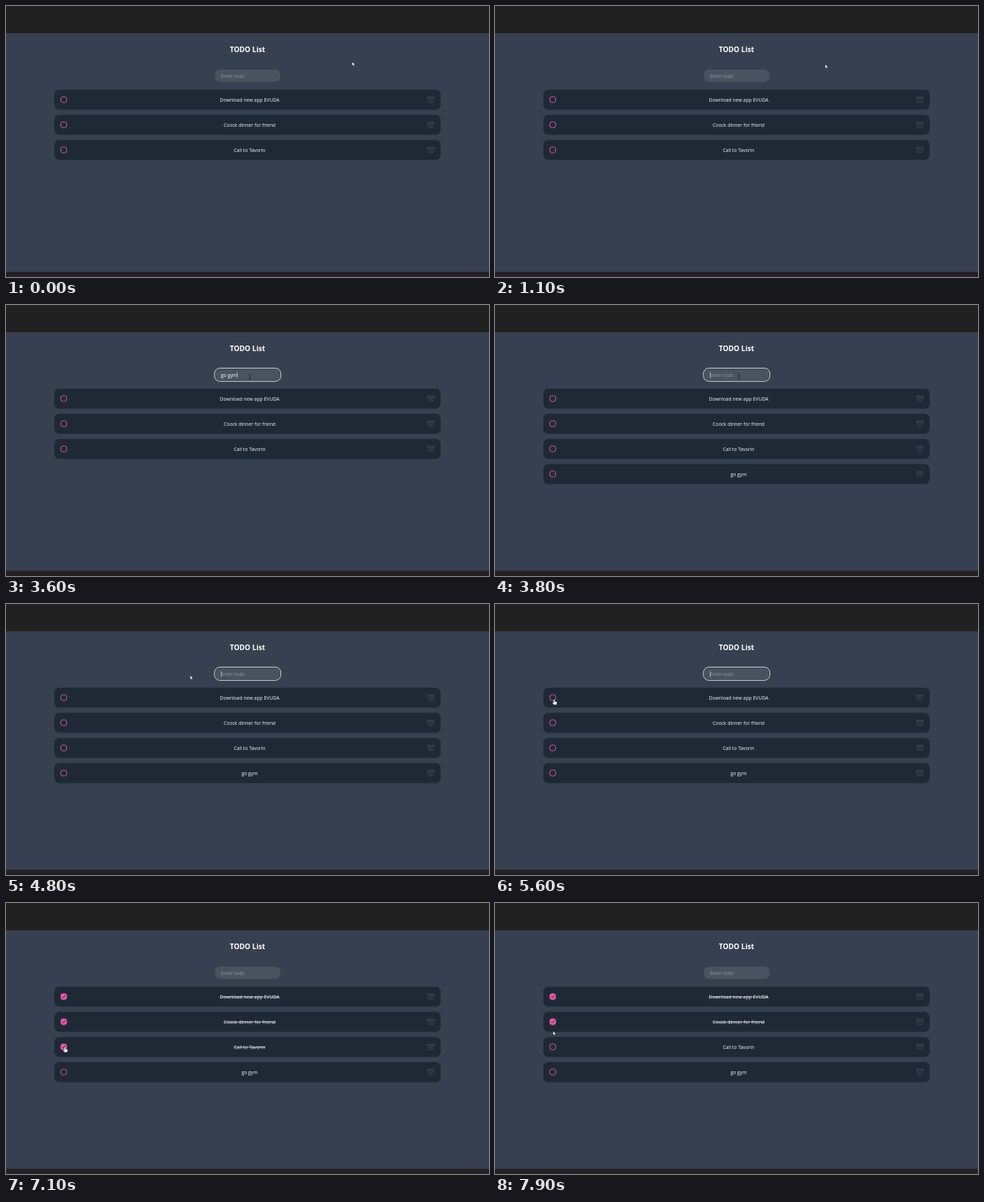
Recreate the animation shown at these times as an HTML page with a canvas. Size 690x388 px, loop 8 s.

```html
<!DOCTYPE html>
<html lang="en">
<head>
<meta charset="utf-8">
<title>TODO List</title>
<style>
  html, body { margin: 0; width: 100%; height: 100%; overflow: hidden; background: #374050; }
  canvas { display: block; width: 690px; height: 388px; }
</style>
</head>
<body>
<canvas id="stage"></canvas>
<script>
const W = 690, H = 388, LOOP = 8000, STEP = 100;
const FONT = '"Open Sans", "Noto Sans", sans-serif';
const PINK = '#e558a8';

const canvas = document.getElementById('stage');
const ctx = canvas.getContext('2d');
const ratio = window.devicePixelRatio || 1;
canvas.width = W * ratio;
canvas.height = H * ratio;

// on/off: when a task is ticked and unticked; from: when it is added
const tasks = [
  { text: 'Download new app EVUDA', on: 5700 },
  { text: 'Coock dinner for friend', on: 6200 },
  { text: 'Call to Tavorin', on: 7100, off: 7700 },
  { text: 'go gym', from: 3800 }
];
const focus = { from: 1900, to: 5700 };
const typing = [[2400, 'g'], [2500, 'go'], [2700, 'go '], [3000, 'go g'],
                [3100, 'go gy'], [3600, 'go gym'], [3800, '']];

// pointer path: time, x, y
const path = [
  [0, 494.5, 80], [1000, 494.5, 80], [1400, 349, 103], [1900, 349, 103],
  [2000, 348.4, 103], [4300, 348.4, 103], [4400, 347, 85], [4500, 347, 85],
  [5300, 82, 139.5], [5500, 82, 139.5], [5600, 84.5, 136.5], [5700, 84.5, 136.5],
  [6100, 84, 171], [6200, 84, 171], [6400, 83.5, 177], [6900, 84, 206],
  [7400, 84, 206], [7500, 83.5, 206.5], [7700, 83.5, 206.5], [7900, 83, 183.5]
];

const rowY = i => 134.1 + i * 36;
const ease = p => p * p * (3 - 2 * p);

function pointerAt(t) {
  const i = path.findIndex(k => k[0] > t);
  if (i < 0) return path[path.length - 1].slice(1);
  const [t0, x0, y0] = path[i - 1], [t1, x1, y1] = path[i];
  const p = ease((t - t0) / (t1 - t0));
  return [x0 + (x1 - x0) * p, y0 + (y1 - y0) * p];
}

function typedAt(t) {
  let text = '';
  for (const [at, value] of typing) if (t >= at) text = value;
  return text;
}

function box(x, y, w, h, r, fill, stroke, line) {
  ctx.beginPath();
  ctx.roundRect(x, y, w, h, r);
  if (fill) { ctx.fillStyle = fill; ctx.fill(); }
  if (stroke) { ctx.strokeStyle = stroke; ctx.lineWidth = line; ctx.stroke(); }
}

function label(text, x, y, size, color, align = 'left', weight = 400) {
  ctx.font = `${weight} ${size}px ${FONT}`;
  ctx.textAlign = align;
  ctx.fillStyle = color;
  ctx.fillText(text, x, y);
  return ctx.measureText(text).width;
}

function trace(d, x, y, scale, stroke, line, fill) {
  ctx.save();
  ctx.translate(x, y);
  ctx.scale(scale, scale);
  ctx.lineJoin = ctx.lineCap = 'round';
  const shape = new Path2D(d);
  if (fill) { ctx.fillStyle = fill; ctx.fill(shape); }
  ctx.strokeStyle = stroke;
  ctx.lineWidth = line;
  ctx.stroke(shape);
  ctx.restore();
}

function drawInput(t) {
  const focused = t >= focus.from && t < focus.to;
  const text = typedAt(t);
  box(298.4, 91, 93.6, 17.7, 7.2, '#49525f');
  if (focused) {
    box(298.5, 91.1, 93.4, 17.5, 7.2, null, '#1d222b', 0.7);
    box(297.8, 90.4, 94.8, 18.9, 7.8, null, '#eceef0', 0.95);
  }
  const width = text ? label(text, 307, 102.6, 6.85, '#fff') : 0;
  if (!text) label('Enter todo', 307, 102.6, 6.85, '#939aa5');
  if (focused) {
    ctx.fillStyle = '#e5e7eb';
    ctx.fillRect(307 + width, 95.8, 0.6, 8.6);
  }
}

function drawTask(task, i, t) {
  if (t < (task.from || 0)) return;
  const y = rowY(i);
  const done = t >= task.on && t < (task.off || LOOP);
  box(69, y - 14.4, 552, 28.8, 7.2, '#1f2936');

  box(78.3, y - 4.3, 8.4, 8.4, 3.2, done ? PINK : null, PINK, 0.95);
  if (done) trace('M-2 .2 L-.6 1.6 L2.2 -1.8', 82.5, y, 1, '#241c35', 0.9);

  const width = label(task.text, 348, y + 2.6, 6.85, '#f8f9fa', 'center');
  if (done) ctx.fillRect(348 - width / 2, y + 0.1, width, 0.6);

  trace('M-9.7 -8.2H9.7V-4.5H-9.7Z M-8.2 -4.5L-7.6 6.2Q-7.4 8.2 -5.4 8.2H5.4Q7.4 8.2 7.6 6.2L8.2 -4.5' +
        'M-2.2 -.4L2.2 4 M2.2 -.4L-2.2 4', 607, y, 0.46, '#48525f', 1.6);
}

function drawPointer(t) {
  const [x, y] = pointerAt(t);
  const overInput = x > 298 && x < 392 && y > 91 && y < 109;
  const overCheck = x > 78 && x < 87.3 &&
    tasks.some((_, i) => Math.abs(y - rowY(i)) < 4.7);
  if (overInput) {
    trace('M-1.2 -3H1.2 M0 -3V3 M-1.2 3H1.2', x, y, 1, '#15191f', 0.6);
  } else if (overCheck) {
    trace('M-.9 .6Q0 -.5 .9 .6V3L3.6 3.6Q4.4 3.9 4.2 4.9L3.5 7.8H-.5L-2.5 5.2Q-2.7 4.2 -1.7 4.3L-.9 5Z',
          x, y, 1, '#11151b', 0.45, '#fff');
  } else {
    trace('M0 0V5.7L1.3 4.5L2.2 6.5L3.1 6.1L2.2 4.2H4Z', x, y, 1, '#11151b', 0.4, '#fff');
  }
}

function draw(t) {
  ctx.setTransform(ratio, 0, 0, ratio, 0, 0);
  ctx.fillStyle = '#374050';
  ctx.fillRect(0, 0, W, H);
  ctx.fillStyle = '#212121';
  ctx.fillRect(0, 0, W, 39);
  ctx.fillStyle = '#232124';
  ctx.fillRect(0, 380.6, W, 8);

  label('TODO List', 345, 65.9, 10.2, '#fff', 'center', 700);
  drawInput(t);
  tasks.forEach((task, i) => drawTask(task, i, t));
  drawPointer(t);
}

const start = performance.now();
function tick() {
  const t = (performance.now() - start) % LOOP;
  draw(Math.floor(t / STEP) * STEP);
  requestAnimationFrame(tick);
}
tick();
</script>
</body>
</html>
```
